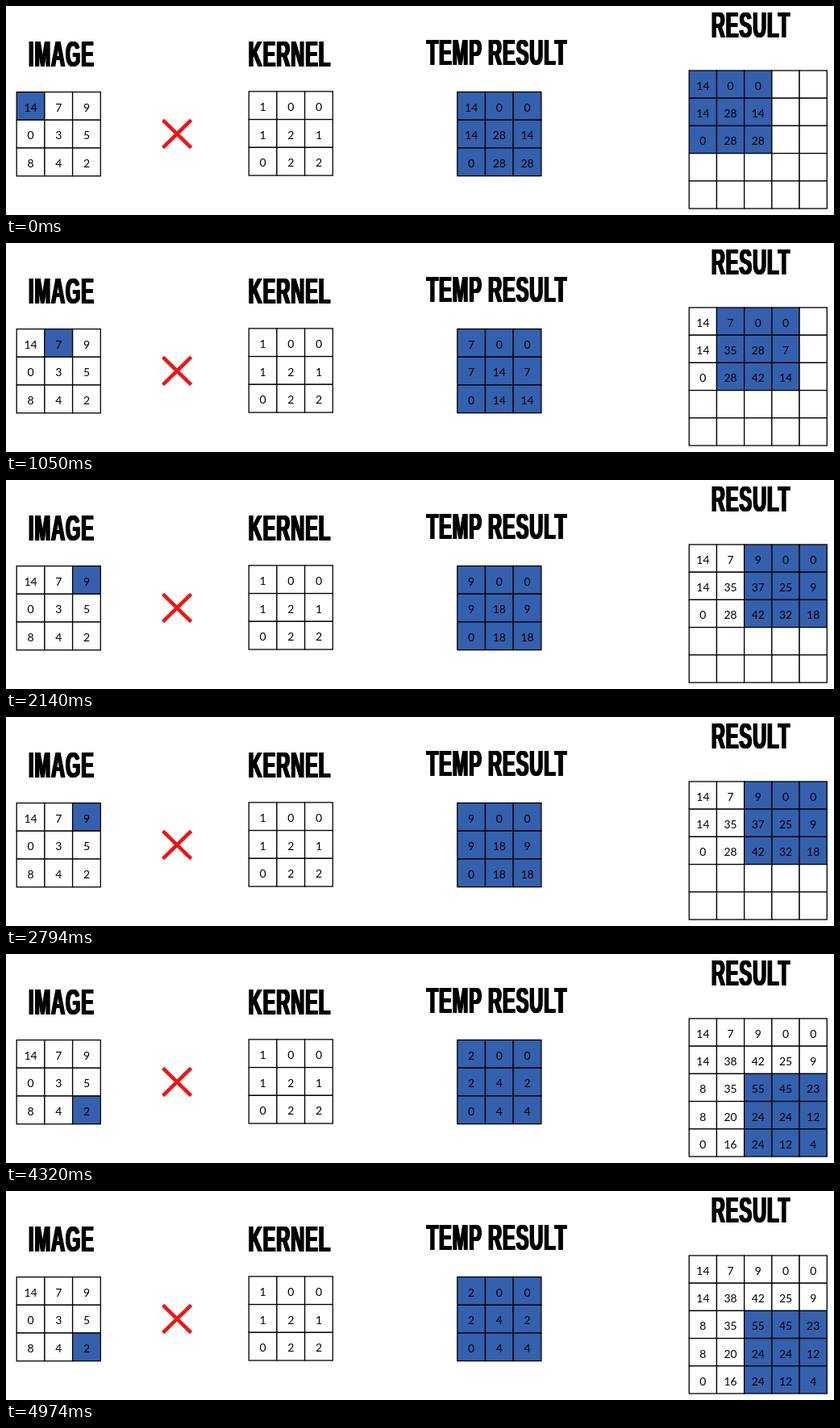
Write an HTML page that moves like this. It is 1027 by 259 pixels and loops after 5.41 s.

```html
<!DOCTYPE html>
<html lang="en">
<head>
<meta charset="utf-8">
<title>Transposed convolution</title>
<style>
  html, body { margin: 0; width: 100%; height: 100%; overflow: hidden; background: #fff; }
  svg { position: absolute; left: 0; top: 0; }
  .cell { fill: #fff; stroke: #000; stroke-width: 1.3; }
  .cell.on { fill: #3460ae; }
  .num { font: 14px Lato, Carlito, sans-serif; text-anchor: middle; fill: #000; }
  .cross { stroke: #f21414; stroke-width: 4.6; fill: none; }
  /* Condensed heavy capitals: one width ratio, thickened sideways */
  h2 {
    position: absolute; margin: 0; white-space: pre; color: #000;
    font: bold 45px/45px "Liberation Sans", Arial, sans-serif;
    letter-spacing: 2px;
    transform: translateX(-50%) scaleX(.52);
    text-shadow: -2px 0, -1px 0, 1px 0, 2px 0;
  }
</style>
</head>
<body>
<svg id="stage" width="1027" height="259" viewBox="0 0 1027 259">
  <path class="cross" d="M194.6 141.4 229.6 175.6M229.6 141.4 194.6 175.6"/>
</svg>
<h2 style="left:69px;top:37px">IMAGE</h2>
<h2 style="left:352px;top:37px">KERNEL</h2>
<h2 style="left:608.5px;top:35px">TEMP RESULT</h2>
<h2 style="left:924px;top:1px">RESULT</h2>
<script>
const IMAGE = [14, 7, 9, 0, 3, 5, 8, 4, 2];
const KERNEL = [1, 0, 0, 1, 2, 1, 0, 2, 2];
const STEPS = [0, 1, 2, 3, 8]; // image cells that are shown in turn
const FIRST = 1050, HOLD = 1090, LOOP = 5410;
const stage = document.getElementById('stage');

function add(tag, attrs) {
  const el = document.createElementNS('http://www.w3.org/2000/svg', tag);
  for (const key in attrs) el.setAttribute(key, attrs[key]);
  return stage.appendChild(el);
}

function makeGrid(x, y, n, size) {
  return Array.from({ length: n * n }, (_, i) => {
    const cx = x + (i % n) * size, cy = y + Math.floor(i / n) * size;
    const box = add('rect', { class: 'cell', x: cx, y: cy, width: size, height: size });
    const label = add('text', { class: 'num', x: cx + size / 2, y: cy + size / 2 + 6.8 });
    return { box, label };
  });
}

function fill(grid, values, isOn) {
  grid.forEach(({ box, label }, i) => {
    label.textContent = values[i] ?? '';
    box.classList.toggle('on', isOn(i));
  });
}

const image = makeGrid(13.2, 106.6, 3, 34.7);
const kernel = makeGrid(301.2, 105.9, 3, 34.7);
const temp = makeGrid(559.8, 106.5, 3, 34.7);
const result = makeGrid(847.3, 80, 5, 34.2);

// Result cell reached by kernel cell k from image cell i
const target = (i, k) =>
  (Math.floor(i / 3) + Math.floor(k / 3)) * 5 + i % 3 + k % 3;

function show(current) {
  const sums = [];
  for (let i = 0; i <= current; i++) {
    KERNEL.forEach((w, k) => {
      const t = target(i, k);
      sums[t] = (sums[t] ?? 0) + w * IMAGE[i];
    });
  }
  const active = new Set(KERNEL.map((_, k) => target(current, k)));
  fill(image, IMAGE, i => i === current);
  fill(temp, KERNEL.map(w => w * IMAGE[current]), () => true);
  fill(result, sums, i => active.has(i));
}

let shown = -1;
function tick() {
  const t = performance.now() % LOOP;
  const step = t < FIRST ? 0 : 1 + Math.floor((t - FIRST) / HOLD);
  if (step !== shown) show(STEPS[shown = step]);
  requestAnimationFrame(tick);
}

fill(kernel, KERNEL, () => false);
tick();
</script>
</body>
</html>
```
